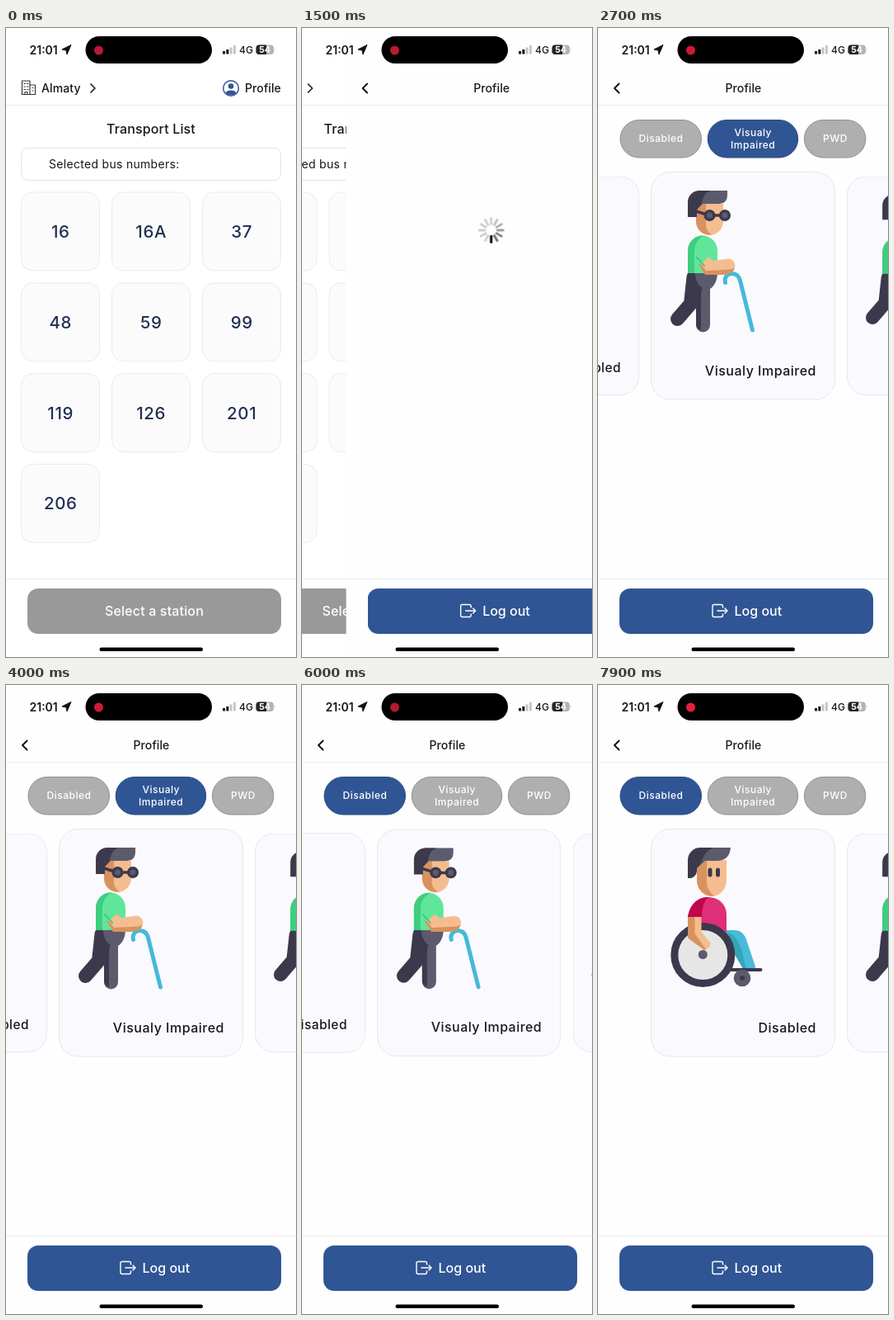
Write an HTML page that moves like this. It is 352 px wide and 762 px high and loops after 8 s.

```html
<!DOCTYPE html>
<html lang="en">
<head>
<meta charset="utf-8">
<title>Transport app</title>
<style>
  html, body { margin: 0; width: 100%; height: 100%; overflow: hidden; background: #fff; }
  svg { display: block; width: 100%; height: 100%; }
  text { font-family: Inter, Roboto, sans-serif; font-size: 16px; font-weight: 500; letter-spacing: .15px; fill: #17171a; }
  .mid { text-anchor: middle; }
  .end { text-anchor: end; }
  .white { fill: #fff; }
  .small { font-size: 14px; letter-spacing: .1px; }
  .plain { font-weight: 400; letter-spacing: .3px; }
  .num { font-size: 20.5px; letter-spacing: .6px; fill: #222f52; }
  .label { letter-spacing: .5px; }
  .pill text { font-size: 12px; letter-spacing: .5px; fill: #fff; text-anchor: middle; }
  .pill rect { fill: #afafaf; stroke: #8f8f8f; }
  .line { fill: none; stroke-linecap: round; stroke-linejoin: round; }
  .rule { stroke: #ebebed; }

  .home, .profile, .on, .off, .load, .body, .card, .rec { animation: 8s linear infinite; }

  /* page push: starts at 1317 ms, lasts 500 ms */
  .home { animation-name: leave; }
  @keyframes leave {
    0%, 16.4625% { transform: none; animation-timing-function: cubic-bezier(.35, .91, .33, .97); }
    22.7125%, 100% { transform: translateX(-117.3px); }
  }
  .profile { animation-name: enter; }
  @keyframes enter {
    0% { transform: translateX(352px); }
    16.4625% { transform: translateX(352px); animation-timing-function: cubic-bezier(.283, .044, .545, .57); }
    17.7% { transform: translateX(161.6px); animation-timing-function: cubic-bezier(.209, 1, .4345, .976); }
    22.7125%, 100% { transform: none; }
  }

  .load { animation-name: until; animation-timing-function: step-end; }
  .body { animation-name: since; animation-timing-function: step-end; }
  @keyframes until { 0% { visibility: visible; } 25%, 100% { visibility: hidden; } }
  @keyframes since { 0% { visibility: hidden; } 25%, 100% { visibility: visible; } }
  .spin { transform-origin: 176px 245px; animation: spin 1s steps(12) infinite; }
  @keyframes spin { to { transform: rotate(360deg); } }

  .on, .off { animation-timing-function: step-end; }
  .pill .on { animation-name: on; }
  .pill .off { animation-name: off; }
  @keyframes on { 0% { fill: #afafaf; stroke: #8f8f8f; } 72.5%, 100% { fill: #305594; stroke: #2a4a80; } }
  @keyframes off { 0% { fill: #305594; stroke: #2a4a80; } 72.5%, 100% { fill: #afafaf; stroke: #8f8f8f; } }

  /* carousel: one step right from 5880 to 6520 ms */
  .card { transform-origin: 176px 312px; animation-timing-function: cubic-bezier(.4, 0, .2, 1); }
  .card > rect { fill: #faf9fd; stroke: #e7e5f0; }
  .c0 { animation-name: c0; }
  .c1 { animation-name: c1; }
  .c2 { animation-name: c2; }
  @keyframes c0 {
    0%, 73.5% { transform: translateX(-233.5px) scale(.96); }
    81.5%, 100% { transform: none; }
  }
  @keyframes c1 {
    0%, 73.5% { transform: none; }
    81.5%, 100% { transform: translateX(233.5px) scale(.96); }
  }
  @keyframes c2 {
    0%, 73.5% { transform: translateX(233.5px) scale(.96); }
    81.5%, 100% { transform: translateX(467px) scale(.96); }
  }

  .rec { fill: #e2203c; animation-name: rec; }
  @keyframes rec {
    0%, 20% { opacity: .82; } 33%, 52% { opacity: .9; }
    72% { opacity: .84; } 77.5% { opacity: .75; } 90%, 100% { opacity: 1; }
  }

  .dark { fill: #3c394c; }
  .slate { fill: #5c5a6d; }
  .skin { fill: #f5bd8f; }
  .tan { fill: #d8925f; }
</style>
</head>
<body>
<svg viewBox="0 0 352 762">
  <defs>
    <g id="walker">
      <path class="line" d="M116 302L112.500 334L96.500 352.500" stroke="#3c394c" stroke-width="17"/>
      <path class="slate" d="M109 296H145C145 306 141 313 136 316V360A8.500 8.500 0 0 1 119 360V314Z"/>
      <path class="dark" d="M109 296H118C118 306 122 312 127 315C125 318 125 322 125 328V366A8.500 8.500 0 0 1 119 360V316C113 312 109 305 109 296Z"/>
      <path d="M109 297V270A18 18.500 0 0 1 145 270V297Z" fill="#60e69b"/>
      <path d="M109 297V270A18 18.500 0 0 1 129 251.600C120 256 117 263 117 272V297Z" fill="#3fcd80"/>
      <path class="skin" d="M119 213H152V234A16.500 17 0 0 1 119 234Z"/>
      <path class="tan" d="M119 213H131V238C131 243 133 247 138 250.500C127 252 119 244 119 234Z"/>
      <path class="slate" d="M122 197H157V202Q157 213 146 213H127L119 221V206Z"/>
      <path class="dark" d="M109 229V211A14 14 0 0 1 123 197H137C130 199 127 205 126 213L120 220V229Z"/>
      <path class="line" d="M119 222L135 227H154" stroke="#3c394c" stroke-width="3.500"/>
      <circle class="dark" cx="135.500" cy="227" r="7"/><circle class="dark" cx="154" cy="227" r="7"/>
      <circle class="slate" cx="135.500" cy="227" r="3.600"/><circle class="slate" cx="154" cy="227" r="3.600"/>
      <path class="line" d="M154.500 308.500C153 302 157 297.500 162.500 297.500C168 297.500 171 300.500 172.500 306L187.500 366" stroke="#46b9d8" stroke-width="5"/>
      <path class="tan" d="M122 286L130 299H152Q165 298 166 290L140 284Z"/>
      <path class="skin" d="M133 276L140 282L158 279.500Q166 280 166.500 288Q166 292 160 292.500L131 294L124 285Z"/>
      <path d="M121 278L127 284L136 276L130 270Z" fill="#60e69b"/>
      <path d="M120 278L129 288" class="line" stroke="#3fcd80" stroke-width="2"/>
    </g>
    <g id="sitter">
      <path d="M148 297H165C173 297 177 301 179.500 307L191 341Q191 344 188 344H178Z" fill="#49bad9"/>
      <path d="M150 300H158C167 303 171 312 174 320L180 344H176L160 316Z" fill="#35a5b5"/>
      <path d="M109 282C111 266 121 257 133 257C147 257 156 266 156 279V299H118Z" fill="#df2f76"/>
      <path d="M109 282C111 266 121 257 134 257C128 262 126 271 126 282Z" fill="#c0054f"/>
      <path class="skin" d="M120 212H156V236A18 20 0 0 1 120 236Z"/>
      <path class="tan" d="M120 212H132V238C132 245 135 251 141 255.500C129 257 120 248 120 236Z"/>
      <path class="slate" d="M124 197H161C160 208 154 213 144 213H130L120 222V205Z"/>
      <path class="dark" d="M109 234V212A15 15 0 0 1 124 197H141C132 200 128 206 126 214L120 222V226Q119 232 113 234Z"/>
      <rect class="dark" x="133.500" y="221.500" width="5" height="11" rx="2.500"/>
      <rect class="dark" x="143" y="221.500" width="5" height="11" rx="2.500"/>
      <path class="line" d="M160 345H197.500" stroke="#3c394c" stroke-width="4"/>
      <circle class="slate" cx="175" cy="355" r="10.300"/><circle class="dark" cx="175" cy="355" r="3"/>
      <circle cx="127.300" cy="327" r="34.500" fill="#e6e6e6" stroke="#3c394c" stroke-width="9"/>
      <circle class="slate" cx="127.300" cy="326.500" r="5.500"/>
      <path class="skin" d="M109 281H125.500V299L137 313Q136 319 129 321L111 308Q108.500 306 109 302Z"/>
      <path class="tan" d="M109 281H117.500V301L131 320L129 321L111 308Q108.500 306 109 302Z"/>
    </g>
  </defs>

  <g class="home">
    <rect width="352" height="762" fill="#fff"/>
    <g class="line" stroke="#3b3b40" stroke-width="1.200">
      <path d="M19.500 80.500V64H29V80.500M29 69H35.500V80.500M19 80.500H36M22 67.500H23.500M25.500 67.500H27M22 71H23.500M25.500 71H27M22 74.500H23.500M25.500 74.500H27M23 80V77.500H26V80M32 72.500H33M32 76H33"/>
      <path d="M32 157.500H43Q44 157.500 44 159V170H31V159Q31 157.500 32 157.500ZM31 165.500H44M31 160.500H44M33.500 170V172.500M41.500 170V172.500M33.500 168H34.500M40.500 168H41.500M30 162V164.500M45 162V164.500"/>
    </g>
    <text class="small" x="43" y="78">Almaty</text>
    <path class="line" d="M103 68L108 73L103 78" stroke="#222" stroke-width="1.700"/>
    <circle cx="273" cy="73" r="9.300" fill="#fff" stroke="#305594" stroke-width="1.500"/>
    <circle cx="273" cy="70.500" r="3.300" fill="#305594"/>
    <path d="M266.500 78.500Q268 75.500 273 75.500T279.500 78.500Q277 81.500 273 81.500T266.500 78.500Z" fill="#305594"/>
    <text class="small" x="290" y="78">Profile</text>
    <path class="rule" d="M0 93.500H352M0 667.500H352"/>
    <text class="mid" x="176" y="128">Transport List</text>
    <rect x="18.500" y="145.500" width="315" height="39" rx="8" fill="#fff" stroke="#e2e2e5"/>
    <text class="small plain" x="52" y="170">Selected bus numbers:</text>
    <g id="tiles"></g>
    <rect x="26" y="679" width="308" height="55" rx="13" fill="#999"/>
    <text class="mid white" x="180" y="712">Select a station</text>
  </g>

  <g class="profile">
    <rect width="352" height="762" fill="#fefefe"/>
    <path class="line" d="M25.500 67.500L20 73L25.500 78.500" stroke="#111" stroke-width="1.900"/>
    <text class="small mid" x="176.500" y="78">Profile</text>
    <path class="rule" d="M0 93.500H352M0 667.500H352"/>
    <g class="load"><g class="spin" id="spokes"></g></g>
    <g class="body">
      <g class="pill">
        <rect class="on" x="27" y="111.500" width="98.500" height="45.500" rx="22.750"/>
        <text x="76.500" y="138.400">Disabled</text>
        <rect class="off" x="133.200" y="111.500" width="109.500" height="45.500" rx="22.750"/>
        <text x="188.200" y="130.600">Visualy</text>
        <text x="188.200" y="145.600">Impaired</text>
        <rect x="250.400" y="111.500" width="74.500" height="45.500" rx="22.750"/>
        <text x="288" y="138.400">PWD</text>
      </g>
      <g id="cards"></g>
    </g>
    <rect x="26" y="679" width="308" height="55" rx="13" fill="#305594"/>
    <path class="line" d="M151.500 702V700.500Q151.500 698.500 149.500 698.500H141Q139 698.500 139 700.500V711.500Q139 713.500 141 713.500H149.500Q151.500 713.500 151.500 711.500V710M145 706H157M154 703L157 706L154 709" stroke="#fff" stroke-width="1.400"/>
    <text class="white" x="165.500" y="711.800" style="letter-spacing:0">Log out</text>
  </g>

  <g>
    <text x="28.500" y="31.500" style="font-size:14px;font-weight:600;letter-spacing:0">21:01</text>
    <path d="M79 20.500L68 26L73 27L74 32Z" fill="#111" stroke="#111" stroke-linejoin="round"/>
    <rect x="96.500" y="10" width="153.500" height="33" rx="16.500"/>
    <circle class="rec" cx="112.500" cy="27" r="5.500"/>
    <path d="M263 28H266V31.500H263ZM267.300 26H270.300V31.500H267.300Z" fill="#111"/>
    <path d="M271.600 23.500H274.600V31.500H271.600ZM275.900 21H278.900V31.500H275.900Z" fill="#c6c6c8"/>
    <text x="283" y="30.800" style="font-size:12px;letter-spacing:0">4G</text>
    <rect x="303.500" y="20.500" width="21.500" height="11.500" rx="3.800" fill="#b4b4b6"/>
    <path d="M316 20.500V32H307.300Q303.500 32 303.500 28.200V24.300Q303.500 20.500 307.300 20.500Z" fill="#252527"/>
    <path d="M326 24.500Q327.500 26.200 326 28Z" fill="#b4b4b6"/>
    <text class="mid white" x="314" y="30" style="font-size:10.500px;font-weight:700;letter-spacing:0">54</text>
    <rect x="113.500" y="750.500" width="125.500" height="4.500" rx="2.250"/>
  </g>
</svg>
<script>
  const fill = (id, items, draw) => {
    document.getElementById(id).innerHTML = items.map(draw).join('');
  };

  fill('tiles', ['16', '16A', '37', '48', '59', '99', '119', '126', '201', '206'], (name, i) => {
    const x = 18.5 + i % 3 * 110, y = 199 + Math.floor(i / 3) * 109.8;
    return `<rect x="${x}" y="${y}" width="95" height="95" rx="14" fill="#fbfbfc" stroke="#ebebef"/>
      <text class="num mid" x="${x + 47.7}" y="${y + 55}">${name}</text>`;
  });

  fill('spokes', [...Array(12).keys()], i =>
    `<path class="line" d="M176 237.500V230.500" stroke="#000" stroke-width="3" transform="rotate(${-30 * i} 176 245)"
      opacity="${[1, .55, .46, .38, .3, .24][i] || .18}"/>`);

  fill('cards', [['Disabled', 'sitter'], ['Visualy Impaired', 'walker'], ['PWD', 'walker']], ([name, art], i) =>
    `<g class="card c${i}"><rect x="64.500" y="174.500" width="223" height="275.500" rx="23"/>
      <use href="#${art}"/><text class="label end" x="265" y="421">${name}</text></g>`);

  // One clock for all keyframes, ten pictures per second.
  const STEP = 100;
  const anims = document.getAnimations();
  anims.forEach(a => a.pause());
  let start;
  function tick(now) {
    start ??= now;
    const t = Math.floor((now - start) / STEP) * STEP;
    anims.forEach(a => { a.currentTime = t; });
    requestAnimationFrame(tick);
  }
  requestAnimationFrame(tick);
</script>
</body>
</html>
```
